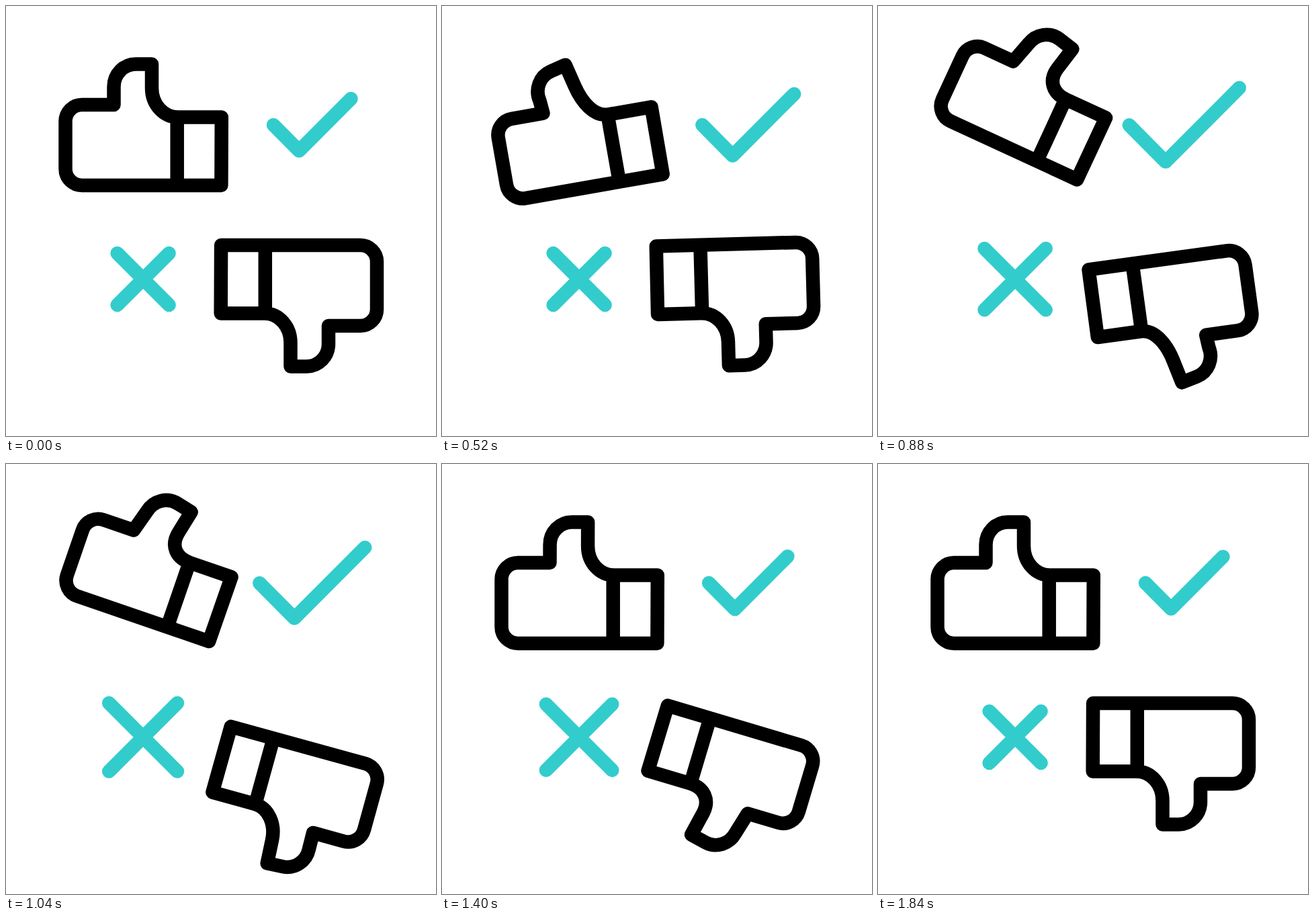
These frames come from a looping animation (640 by 640 pixels, 1960 ms). An HTML page:

```html
<!DOCTYPE html>
<html lang="en">
<head>
<meta charset="utf-8">
<title>Thumbs up, thumbs down</title>
<style>
  html, body { margin: 0; height: 100%; overflow: hidden; background: #fff; }
  svg { display: block; width: 100vw; height: 100vh; }
  path { fill: none; stroke: #000; stroke-width: 20.5; stroke-linecap: round; stroke-linejoin: round; }
  .mark { stroke: #33cccc; vector-effect: non-scaling-stroke; }
</style>
</head>
<body>
<svg viewBox="0 0 640 640">
  <path id="up"/>
  <g transform="rotate(180 320.25 311.5)"><path id="down"/></g>
  <path id="check" class="mark" d="M-57.7 .5L-19.5 39L57.8 -38.5"/>
  <path id="cross" class="mark" d="M-38.5 -38.5L38.5 38.5M38.5 -38.5L-38.5 38.5"/>
</svg>
<script>
const LOOP = 1960, STEP = 40;
const DELAY = 330;      // the lower pair repeats the upper pair's motion this much later
const THUMB_LAG = 80;   // the thumb trails its hand

const set = (id, name, value) => document.getElementById(id).setAttribute(name, value);

// Eased progress from 0 at time a to 1 at time b.
function ease(t, a, b) {
  const x = Math.min(1, Math.max(0, (t - a) / (b - a)));
  return x * x * x * (10 - 15 * x + 6 * x * x);
}

const pulse = (t, start, peak, end) => ease(t, start, peak) - ease(t, peak, end);

// Wind back to low, swing over to high, settle at zero.
const swing = (t, low, high) =>
  low * ease(t, 90, 450) + (high - low) * ease(t, 450, 860) - high * ease(t, 860, 1375);

// Hand outline whose thumb is rotated by the given angle in degrees.
function handPath(bend) {
  const a = bend * Math.PI / 180, c = Math.cos(a), s = Math.sin(a);
  const [px, py] = bend < 0 ? [192, 131] : [194, 160];
  const p = (x, y) => {
    x -= px; y -= py;
    return `${px + c * x - s * y} ${py + s * x + c * y} `;
  };
  return 'M320.8 165.5L320.4 267H113A24.5 24.5 0 0 1 88.5 242.5V171.5A24.5 24.5 0 0 1 113 147H160.5' +
    'L' + p(160.5, 120) + 'C' + p(160.5, 101.5) + p(175, 86.5) + p(193, 86.5) +
    'L' + p(217, 86.5) + 'L' + p(217, 122) + 'C' + p(217, 146) + '234 165.5 256 165.5' +
    'ZM254.7 165.5V267';
}

function drawHand(id, t, lift) {
  const turn = swing(t, -11.3, 24.8);
  const drift = 3 * (turn / 25) ** 2;
  set(id, 'd', handPath(swing(t - THUMB_LAG, -14, 13.5)));
  set(id, 'transform', `translate(${-drift} ${-lift}) rotate(${turn} 320.6 216.2)`);
}

function drawMark(id, t, x, y, growth) {
  const size = 1 + growth * pulse(t, 230, 850, 1513);
  set(id, 'transform', `translate(${x} ${y}) scale(${size})`);
  set(id, 'stroke-width', 20.5);
}

function draw(t) {
  const late = t - DELAY;
  drawHand('up', t, 16 * pulse(t, 80, 480, 1100));
  drawHand('down', late, 36 * pulse(late, 110, 570, 1174));
  drawMark('check', t, 455.7, 176.5, .42);
  drawMark('cross', late, 204.1, 406.6, .35);
}

// Non-scaling strokes are measured in screen pixels, so follow the stage size.
const start = performance.now();
function tick() {
  const t = (performance.now() - start) % LOOP;
  draw(Math.floor(t / STEP) * STEP);
  requestAnimationFrame(tick);
}
tick();
</script>
</body>
</html>
```
